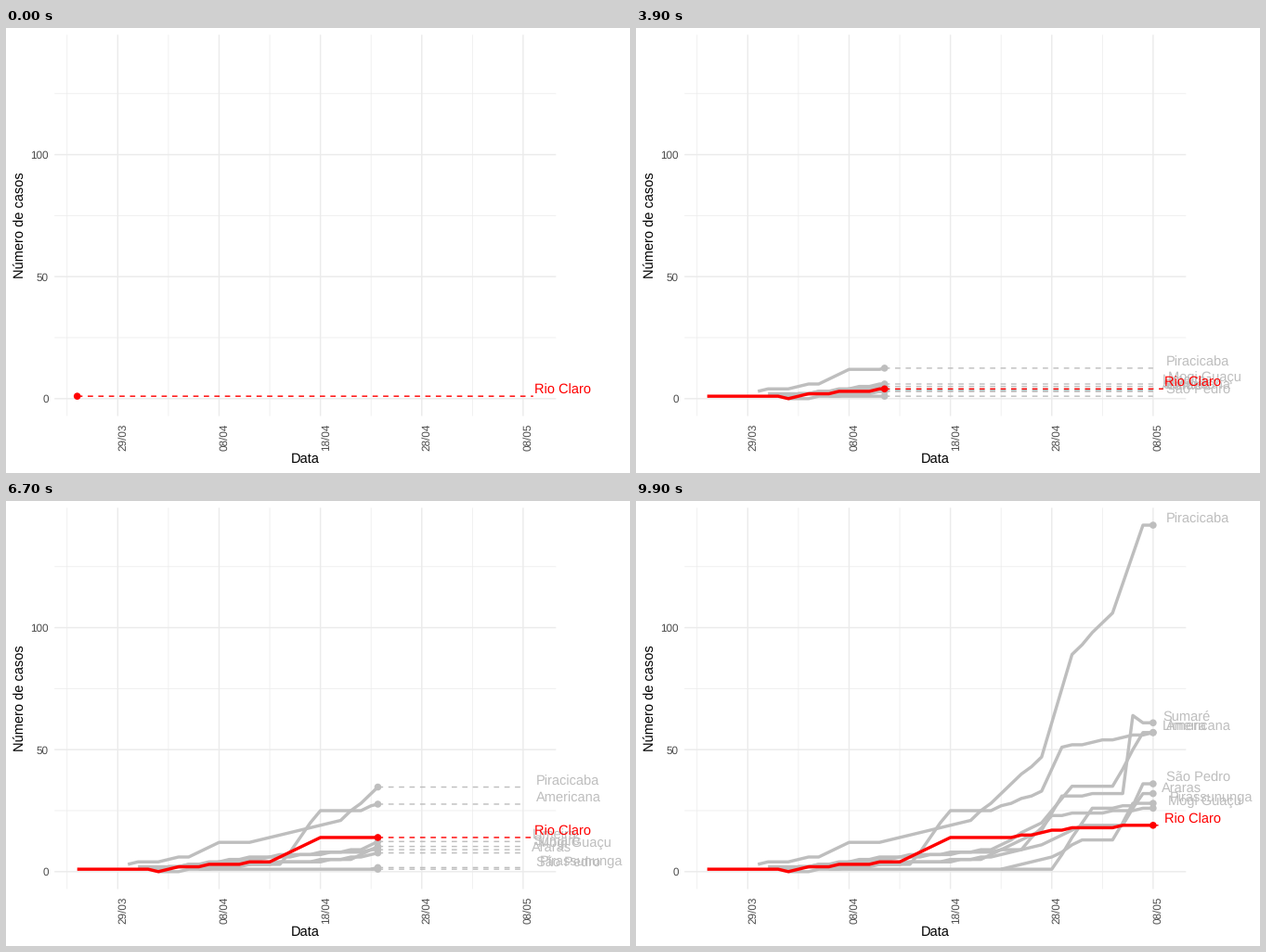
Recreate the animation shown at these times as a matplotlib script. Size 672 px wide and 480 px high, loop 10000 ms.

```python
import numpy as np
import matplotlib.pyplot as plt
from matplotlib.animation import FuncAnimation

W, H, DPI = 672, 480, 96
FRAMES, DAYS = 100, 44
GRAY, RED = "#BEBEBE", "#FF0000"
PX = 72 / DPI  # points per pixel

plt.rcParams.update({
    "font.family": "Liberation Sans",
    "text.hinting": "none",
    "path.snap": False,
    "path.simplify": False,
})

# Turning points (day, cases); whole counts in between follow by interpolation
CITIES = {
    "Americana": [(6, 2), (20, 3), (24, 25), (28, 25), (33, 33), (35, 51), (44, 57)],
    "Araras": [(12, 1), (28, 6), (33, 11), (37, 19), (41, 19), (43, 32)],
    "Limeira": [(7, 1), (28, 9), (33, 20), (36, 35), (40, 35), (43, 57)],
    "Mogi Guaçu": [(8, 1), (17, 6), (31, 9), (34, 23), (44, 26)],
    "Piracicaba": [(5, 3), (11, 6), (14, 12), (17, 12), (26, 21), (33, 47),
                   (36, 89), (40, 106), (43, 142)],
    "Pirassununga": [(29, 1), (34, 6), (37, 13), (40, 13), (42, 28)],
    "São Pedro": [(8, 0), (12, 1), (34, 1), (38, 26), (42, 27), (43, 36)],
    "Sumaré": [(9, 2), (27, 5), (33, 17), (35, 31), (41, 32), (42, 64), (43, 61)],
    "Rio Claro": [(0, 1), (7, 1), (8, 0), (10, 2), (19, 4), (24, 14), (30, 14),
                  (36, 18), (44, 19)],
}


def px(day):
    return 76.7 + 10.913 * np.asarray(day, float)


def py(value):
    return 399.8 - 2.632 * np.asarray(value, float)


fig = plt.figure(figsize=(W / DPI, H / DPI), dpi=DPI, facecolor="white")
ax = fig.add_axes([0, 0, 1, 1])
ax.set_xlim(0, W)
ax.set_ylim(H, 0)
ax.axis("off")


def label(x, y, text, size, color, **kw):
    return ax.text(x, y, text, fontsize=size, color=color, va="baseline",
                   rotation_mode="anchor", **kw)


def stroke(xs, ys, color, width, **kw):
    return ax.plot(xs, ys, color=color, lw=width * PX, solid_capstyle="butt",
                   dash_capstyle="butt", solid_joinstyle="round", **kw)[0]


def grid(days, values, width):
    for x in px(days):
        stroke([x, x], [7.3, 418.5], "#EBEBEB", width, zorder=0)
    for y in py(values):
        stroke([52.2, 592.3], [y, y], "#EBEBEB", width, zorder=0)


def draw_axes():
    grid(range(-1, 40, 10), range(25, 126, 50), 0.71)
    grid(range(4, 45, 10), range(0, 101, 50), 1.42)
    for value in range(0, 101, 50):
        label(46, py(value) + 4.2, str(value), 8.8, "#4D4D4D", ha="right")
    for day in range(4, 45, 10):
        dates = np.datetime64("2020-03-25") + day
        year, month, date = str(dates).split("-")
        label(px(day) + 9, 455.5, f"{date}/{month}", 8.8, "#4D4D4D",
              ha="left", rotation=90)
    label(322.3, 469, "Data", 11, "black", ha="center")
    label(19, 212.5, "Número de casos", 11, "black", ha="center", rotation=90)


class City:
    def __init__(self, name, turns):
        days, cases = zip(*turns)
        self.days = np.arange(days[0], DAYS + 1)
        self.cases = np.round(np.interp(self.days, days, cases))
        main = name == "Rio Claro"
        color, z = (RED, 10) if main else (GRAY, 1)
        self.end = px(DAYS + main)
        self.dash = stroke([], [], color, 1.42, ls=(0, (4, 4)), zorder=z)
        self.line = stroke([], [], color, 3.41, zorder=z + 1)
        self.dot = ax.add_patch(plt.Circle((0, 0), 3.8, fc=color, lw=0, zorder=z + 2))
        self.text = label(0, 0, name, 11, color, ha="left", zorder=z + 3)
        width = self.text.get_window_extent(fig.canvas.get_renderer()).width
        self.text_x = px(DAYS) + 0.2 * width
        self.parts = [self.dash, self.line, self.dot, self.text]

    def show(self, now):
        visible = now >= self.days[0]
        for part in self.parts:
            part.set_visible(visible)
        past = self.days < now
        x, y = px(now), py(np.interp(now, self.days, self.cases))
        self.line.set_data(np.append(px(self.days[past]), x),
                           np.append(py(self.cases[past]), y))
        self.dash.set_data([x, self.end], [y, y])
        self.dot.center = x, y
        self.text.set_position((self.text_x, y - 2.1))


draw_axes()
cities = [City(name, turns) for name, turns in CITIES.items()]

# Each day begins on a whole frame, so days last two or three frames
day_starts = [round(d * (FRAMES - 1) / DAYS) for d in range(DAYS + 1)]


def update(frame):
    now = np.interp(frame, day_starts, range(DAYS + 1))
    for city in cities:
        city.show(now)
    return [part for city in cities for part in city.parts]


anim = FuncAnimation(fig, update, frames=FRAMES, interval=100, repeat=True,
                     repeat_delay=0, blit=False)
plt.show()
```
